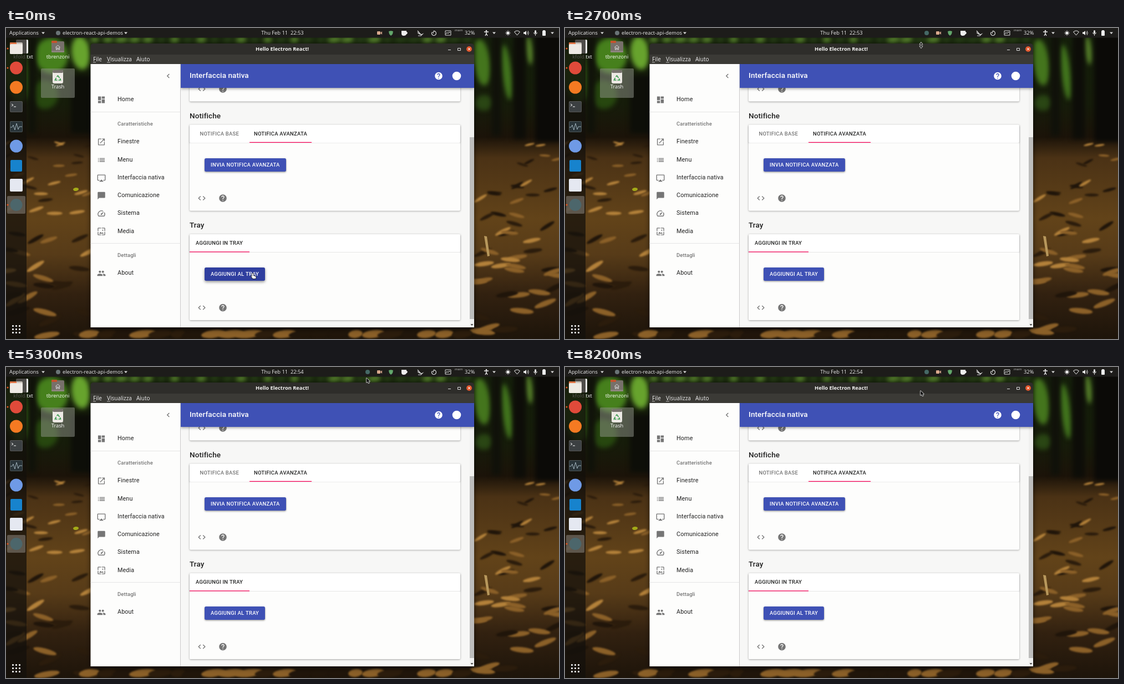
Write an HTML page with a canvas that moves like this. It is 997 px wide and 561 px high and loops after 8.3 s.

```html
<!DOCTYPE html>
<html lang="it">
<head>
<meta charset="utf-8">
<title>Hello Electron React!</title>
<style>
html, body { margin: 0; width: 100%; height: 100%; overflow: hidden; background: #1a1410; }
canvas { display: block; width: 100vw; height: 100vh; }
</style>
</head>
<body>
<canvas id="stage" width="997" height="561"></canvas>
<script>
const W = 997, H = 561, LOOP = 8300, STEP = 100;
const screen2d = document.getElementById('stage').getContext('2d');
const still = document.createElement('canvas');
still.width = W;
still.height = H;
let c = still.getContext('2d');

const UI = '"Open Sans", "Noto Sans", sans-serif';
const APP = 'Roboto, sans-serif';
const GREY = '#757575', INK = '#212121', BLUE = '#3f51b5', PINK = '#f50057', PAPER = '#fdfdfc';

const ICONS = {
  help: 'M12 2C6.48 2 2 6.48 2 12s4.48 10 10 10 10-4.48 10-10S17.52 2 12 2zm1 17h-2v-2h2v2zm2.07-7.75l-.9.92C13.45 12.9 13 13.5 13 15h-2v-.5c0-1.1.45-2.1 1.17-2.83l1.24-1.26c.37-.36.59-.86.59-1.41 0-1.1-.9-2-2-2s-2 .9-2 2H8c0-2.21 1.79-4 4-4s4 1.79 4 4c0 .88-.36 1.68-.93 2.25z',
  code: 'M9.4 16.6L4.8 12l4.6-4.6L8 6l-6 6 6 6 1.4-1.4zm5.2 0l4.6-4.6-4.6-4.6L16 6l6 6-6 6-1.4-1.4z',
  home: 'M3 13h8V3H3v10zm0 8h8v-6H3v6zm10 0h8V11h-8v10zm0-18v6h8V3h-8z',
  launch: 'M19 19H5V5h7V3H5c-1.11 0-2 .9-2 2v14c0 1.1.89 2 2 2h14c1.1 0 2-.9 2-2v-7h-2v7zM14 3v2h3.59l-9.83 9.83 1.41 1.41L19 6.41V10h2V3h-7z',
  list: 'M3 13h2v-2H3v2zm0 4h2v-2H3v2zm0-8h2V7H3v2zm4 4h14v-2H7v2zm0 4h14v-2H7v2zM7 7v2h14V7H7z',
  display: 'M6 22h12l-6-6zM21 3H3c-1.1 0-2 .9-2 2v12c0 1.1.9 2 2 2h4v-2H3V5h18v12h-4v2h4c1.1 0 2-.9 2-2V5c0-1.1-.9-2-2-2z',
  chat: 'M20 2H4c-1.1 0-2 .9-2 2v18l4-4h14c1.1 0 2-.9 2-2V4c0-1.1-.9-2-2-2z',
  speed: 'M20.38 8.57l-1.23 1.85a8 8 0 0 1-.22 7.58H5.07A8 8 0 0 1 15.58 6.85l1.85-1.23A10 10 0 0 0 3.35 19a2 2 0 0 0 1.72 1h13.85a2 2 0 0 0 1.74-1 10 10 0 0 0-.27-10.44zm-9.79 6.84a2 2 0 0 0 2.83 0l5.66-8.49-8.49 5.66a2 2 0 0 0 0 2.83z',
  media: 'M4 4h7V2H4c-1.1 0-2 .9-2 2v7h2V4zm6 9l-4 5h12l-3-4-2.03 2.71L10 13zm7-4.5c0-.83-.67-1.5-1.5-1.5S14 7.67 14 8.5s.67 1.5 1.5 1.5S17 9.33 17 8.5zM20 2h-7v2h7v7h2V4c0-1.1-.9-2-2-2zm0 18h-7v2h7c1.1 0 2-.9 2-2v-7h-2v7zM4 13H2v7c0 1.1.9 2 2 2h7v-2H4v-7z',
  people: 'M16 11c1.66 0 2.99-1.34 2.99-3S17.66 5 16 5c-1.66 0-3 1.34-3 3s1.34 3 3 3zm-8 0c1.66 0 2.99-1.34 2.99-3S9.66 5 8 5C6.34 5 5 6.34 5 8s1.34 3 3 3zm0 2c-2.33 0-7 1.17-7 3.5V19h14v-2.5c0-2.33-4.67-3.5-7-3.5zm8 0c-.29 0-.62.02-.97.05 1.16.84 1.97 1.97 1.97 3.45V19h6v-2.5c0-2.33-4.67-3.5-7-3.5z',
  back: 'M15.41 7.41L14 6l-6 6 6 6 1.41-1.41L10.83 12z'
};

function box(x, y, w, h, color, r = 0) {
  c.fillStyle = color;
  c.beginPath();
  c.roundRect(x, y, w, h, r);
  c.fill();
}

function disc(x, y, r, color) {
  c.fillStyle = color;
  c.beginPath();
  c.arc(x, y, r, 0, 7);
  c.fill();
}

function blob(x, y, rx, ry, color, turn = -0.12) {
  c.fillStyle = color;
  c.beginPath();
  c.ellipse(x, y, rx, ry, turn, 0, 7);
  c.fill();
}

function shape(d, x, y, fill, stroke, width = 1, scale = 1) {
  const path = new Path2D(d);
  c.save();
  c.translate(x, y);
  c.scale(scale, scale);
  c.lineWidth = width;
  if (stroke) { c.strokeStyle = stroke; c.stroke(path); }
  if (fill) { c.fillStyle = fill; c.fill(path); }
  c.restore();
}

function icon(name, x, y, color = GREY, size = 16.2) {
  shape(ICONS[name], x - size / 2, y - size / 2, color, null, 1, size / 24);
}

function text(s, x, y, font, color, align = 'left', spacing = 0) {
  c.font = font;
  c.fillStyle = color;
  c.textAlign = align;
  c.letterSpacing = spacing + 'px';
  c.fillText(s, x, y);
}

const ui = (s, x, y, color = '#eee', align, size = 9.3, weight = 400) =>
  text(s, x, y, `${weight} ${size}px ${UI}`, color, align);
const body = (s, x, y) => text(s, x, y, `10.8px ${APP}`, INK, 'left', 0.1);
const title = (s, x, y, color = INK) => text(s, x, y, `500 13.5px ${APP}`, color, 'left', 0.1);
const label = (s, x, y, color, spacing = 0.27) => text(s, x, y, `500 9.45px ${APP}`, color, 'left', spacing);

function shadowed(draw, alpha = 0.35, blur = 3, dy = 1) {
  c.save();
  c.shadowColor = `rgba(0,0,0,${alpha})`;
  c.shadowBlur = blur;
  c.shadowOffsetY = dy;
  draw();
  c.restore();
}

function seeded(seed) {
  return () => (seed = seed * 16807 % 2147483647) / 2147483647;
}

// Soft woodland: dark trunks, lit leaves, sunlit litter
function wallpaper() {
  const g = c.createLinearGradient(0, 17, 0, H);
  [[0, '#15200b'], [0.22, '#161c0a'], [0.33, '#1b1309'], [0.4, '#4b3215'],
   [0.6, '#624319'], [0.72, '#573b18'], [0.85, '#322110'], [1, '#1d140a']].forEach(s => g.addColorStop(...s));
  c.fillStyle = g;
  c.fillRect(0, 0, W, H);
  const rnd = seeded(11);
  c.save();
  c.filter = 'blur(4px)';
  for (let x = 160; x < 840; x += 24) {
    blob(x, 21, 8 + rnd() * 5, 6, rnd() < 0.5 ? '#55802c' : '#263c16');
  }
  [[82, 50, 30, 32, '#46801c'], [135, 45, 17, 30, '#67a32d'], [70, 120, 24, 26, '#27470f'],
   [20, 80, 24, 55, '#2c5212'], [858, 62, 15, 42, '#44751d'], [903, 80, 9, 50, '#41731d'],
   [943, 40, 7, 26, '#557e2a'], [862, 135, 16, 14, '#2a4614']
  ].forEach(p => blob(...p));
  box(40, 10, 14, 180, '#10120a');
  box(117, 85, 38, 105, '#0d0e08');
  box(876, 10, 16, 185, '#10110a');
  box(915, 10, 22, 190, '#0d0d08');
  box(954, 10, 50, 195, '#0b0a07');
  c.filter = 'blur(1.5px)';
  const tones = ['#20150a', '#2b1c0c', '#8b6028', '#b3813a'];
  for (let i = 0; i < 96; i++) {
    const x = i % 2 ? 844 + rnd() * 153 : rnd() * 155;
    const y = 205 + rnd() * 350;
    const near = (y - 180) / 370;
    const tone = tones[Math.floor(rnd() * (y > 440 ? 3 : 4))];
    blob(x, y, 8 + near * 15, 1.5 + near * 4, tone, (rnd() - 0.65) * 0.9);
  }
  for (let x = 150; x < 850; x += 32) {
    blob(x, 552, 12 + rnd() * 14, 7, tones[Math.floor(rnd() * 3)]);
  }
  c.restore();
  blob(126, 291, 5, 3, '#a3aa18');
  shape('M0 0L5 1L10 36L6 37Z', 862, 375, '#b8985c');
}

function desktop() {
  // file, home folder and trash
  box(18, 21, 22, 25, '#eee', 2);
  ui('kfold.txt', 31, 55, '#fff', 'center');
  box(82, 24, 23, 20, '#77706a', 2);
  box(82, 23, 10, 4, '#c5532d', 1);
  box(82, 41, 23, 3, '#8d857e', 1);
  shape('M-4 1L0-3L4 1M-3 0V5H-1V2H1V5H3V0', 93.5, 34, null, '#ddd');
  ui('tbrenzoni', 93.5, 55, '#fff', 'center');
  box(63, 73, 61, 53, 'rgba(145,150,140,.5)', 2);
  box(84, 76, 19, 24, '#ece9e4', 3);
  box(84, 76, 19, 5, '#77736d', 2);
  shape('M-2-3L0-5L3-1M4 0L5 3H1M-1 3H-5L-3-1', 93.5, 91, null, '#3a9a4e', 1.7);
  ui('Trash', 93.5, 109, '#fff', 'center');
}

function dock() {
  box(0, 17, 37, H - 17, 'rgba(18,16,12,.72)');
  box(2, 303, 33, 32, 'rgba(255,255,255,.25)', 2);
  for (const y of [37, 72, 319]) disc(3, y, 1.5, '#e95420');
  box(7, 26, 23, 21, '#c9c3bb', 2);
  box(7, 26, 12, 5, '#df7445', 1);
  box(7, 29, 23, 18, '#eeeae4', 2);
  disc(18.5, 72, 11.5, '#e04a3a');
  disc(18.5, 107, 11.5, '#f57a22');
  box(7, 132, 23, 20, '#565656', 2);
  box(8, 133, 21, 18, '#3c4042', 2);
  shape('M10 137L13 139L10 141M14 142H18', 0, 0, null, '#fff', 1);
  box(7, 168, 23, 20, '#4d5658', 2);
  box(8, 169, 21, 18, '#293439', 1);
  shape('M8 179H11L13 175L16 184L19 172L22 183L24 178H29', 0, 0, null, '#9caeb8', 1);
  disc(18.5, 213, 11.5, '#6f9ae6');
  box(8, 238, 21, 21, '#1783cd', 2);
  box(7, 272, 23, 23, '#e5e8f1', 2);
  disc(18.5, 319, 11, '#4c666b');
  for (let i = 0; i < 9; i++) box(11 + i % 3 * 6, 536 + Math.floor(i / 3) * 6, 3, 3, '#eee', 1);
}

const arrow = (x, y) => shape('M-3-1.5H3L0 2Z', x, y, '#ddd');

function topBar() {
  box(0, 0, W, 17.5, '#1d1c1a');
  ui('Applications', 6, 12);
  arrow(67, 9);
  disc(94, 9, 4, '#6a7476');
  ui('electron-react-api-demos', 102, 12);
  arrow(216, 9);
  box(669, 6, 6, 6, '#d9a98d', 1);
  shape('M675 9L678 6V12Z', 0, 0, '#d9a98d');
  shape('M-4-3L0-4L4-3L3 2L0 5L-3 2Z', 694, 9, '#63a76c');
  shape('M-5-4H4V2Q3 5-1 5Q-5 5-5 1ZM4-2Q7-2 5 2L4 2', 718, 9, '#eee');
  shape('M-4-4L2 3M-4-1Q0 4 5 2L2 5H-3', 746, 9, null, '#ddd', 1.2);
  shape('M-3-2A4 4 0 1 0 0-4V-2M0 0L-2-2', 771, 9.5, null, '#ddd', 1.2);
  shape('M-5-4H5V4H-5ZM-4 2L-2-1L0 1L2-2L4 0', 797, 9, null, '#ddd');
  ui('mem', 809, 6, '#bbb', 'left', 6);
  ui('32%', 827, 12);
  disc(866, 5, 1.3, '#eee');
  shape('M-4-2H4M0-2V1L-2 5M0 1L2 5', 866, 9, null, '#eee', 1.3);
  arrow(880, 9);
  disc(905, 9, 2.6, '#eee');
  shape('M0-5V5M-5 0H5M-3.5-3.5L3.5 3.5M3.5-3.5L-3.5 3.5', 905, 9, null, '#eee', 0.8);
  shape('M-5-2Q0-6 5-2L0 4Z', 921.5, 9, null, '#eee', 1);
  shape('M-4-1.5H-2L1-4V4L-2 1.5H-4Z', 937, 9, '#eee');
  shape('M3-2Q4 0 3 2M4-4Q7 0 4 4', 937, 9, null, '#ddd', 0.9);
  box(953, 4, 3, 6, '#eee', 1.5);
  shape('M-3 0Q-3 3 0 3Q3 3 3 0M0 3V6', 954.5, 8, null, '#eee', 0.9);
  box(967, 5, 6, 9, '#eee', 1);
  box(968, 4, 4, 2, '#eee');
  arrow(985, 9);
}

function tools(y) {
  icon('code', 353, y);
  icon('help', 391, y);
}

function card(top, tabs, bottom) {
  shadowed(() => box(331, top, 488, bottom - top, PAPER, 2));
  shadowed(() => box(331, top, 488, tabs - top, '#fff', 2), 0.25, 3);
  box(331, tabs, 488, bottom - tabs, PAPER, 2);
  box(331, tabs, 488, 0.6, '#ddd');
  tools(bottom - 22.5);
}

function button(s, x, y, w, color, lift = 0) {
  shadowed(() => box(x, y, w, 24, color, 2.7), 0.42, 3 + lift * 2, 1.2 + lift);
  label(s, x + 11, y + 15, '#fff');
}

function appWindow() {
  shadowed(() => box(152.5, 28, 691.5, 512, '#2e2d2a', [5, 5, 0, 0]), 0.6, 10, 3);
  ui('Hello Electron React!', 498, 41, '#f4f4f2', 'center', 9.3, 700);
  box(797, 39, 5, 1, '#ddd');
  shape('M814.5 36.5H819.5V40.5H814.5Z', 0, 0, null, '#ddd');
  disc(835, 38, 5, '#e2572c');
  shape('M-2-2L2 2M2-2L-2 2', 835, 38, null, '#fff', 1);
  box(152.5, 48, 691.5, 17, '#3b3a36');
  ui('File', 157, 60, '#eee', 'left', 10);
  ui('Visualizza', 182, 60, '#eee', 'left', 10);
  ui('Aiuto', 235, 60, '#eee', 'left', 10);
  box(157, 61.5, 5, 0.8, '#ddd');
  box(182, 61.5, 6, 0.8, '#ddd');

  box(315, 65, 529, 475, '#f7f7f6');
  box(836, 108, 8, 432, '#f0f0ef');
  box(836, 197, 8, 328, '#bdbdbc');
  shape('M-2.5-1H2.5L0 2Z', 840, 535, '#444');
  c.save();
  c.beginPath();
  c.rect(315, 108, 521, 432);
  c.clip();
  shadowed(() => box(331, 60, 488, 72.5, PAPER, 2));
  tools(110);
  title('Notifiche', 331, 163);
  card(174.5, 207, 329.5);
  label('NOTIFICA BASE', 349.5, 194, '#757575');
  label('NOTIFICA AVANZATA', 447, 194, INK);
  box(439, 205.7, 112, 1.4, PINK);
  button('INVIA NOTIFICA AVANZATA', 358, 235, 147, BLUE);
  title('Tray', 331, 360);
  card(372, 404.5, 527);
  label('AGGIUNGI IN TRAY', 342, 391, INK);
  box(331, 403.2, 108, 1.4, PINK);
  c.restore();

  shadowed(() => box(315, 65, 529, 43, BLUE), 0.4, 5, 1.5);
  title('Interfaccia nativa', 331, 90, '#fff');
  icon('help', 780, 86.5, '#fff');
  disc(812.5, 86.5, 7.8, '#fff');

  box(152.5, 65, 162, 475, PAPER);
  box(314, 65, 0.8, 475, '#d9d9d9');
  box(152.5, 151, 162, 0.8, '#dedede');
  box(152.5, 388, 162, 0.8, '#dedede');
  icon('back', 292.5, 86.5);
  label('Caratteristiche', 201, 176, GREY, 0.1);
  label('Dettagli', 201, 413, GREY, 0.1);
  [['home', 'Home', 129], ['launch', 'Finestre', 205], ['list', 'Menu', 237.5],
   ['display', 'Interfaccia nativa', 270], ['chat', 'Comunicazione', 302],
   ['speed', 'Sistema', 334], ['media', 'Media', 366.5], ['people', 'About', 442]
  ].forEach(([name, s, y]) => {
    icon(name, 172, y + 0.5);
    body(s, 201, Math.floor(y + 3.5));
  });
}

const clamp = v => Math.max(0, Math.min(1, v));
const PATH = [
  [0, 445, 443], [1900, 445, 443], [2600, 642, 31], [2800, 642, 31], [3050, 651, 10],
  [3500, 651, 10], [3800, 647, 32], [4200, 641, 75], [4700, 641, 75], [5300, 650, 20],
  [5500, 652, 10], [5850, 652, 10], [6350, 641, 75], [6800, 641, 75], [7200, 640, 48],
  [7900, 640, 48], [8150, 641, 43], [LOOP, 641, 43]
];

function pointerAt(t) {
  const i = PATH.findIndex((p, k) => k && t <= p[0]);
  const [t0, x0, y0] = PATH[i - 1], [t1, x1, y1] = PATH[i];
  const u = (t - t0) / (t1 - t0), e = u * u * (3 - 2 * u);
  return { x: x0 + (x1 - x0) * e, y: y0 + (y1 - y0) * e };
}

function trayMenu(alpha, checked, y) {
  c.save();
  c.globalAlpha = alpha;
  box(642, 16, 20, 1.6, '#e95420');
  shadowed(() => {
    box(581, 26, 142, 98, '#f7f7f6', 4);
    shape('M-7 7L0 0L7 7Z', 652, 19.5, '#f7f7f6');
  }, 0.5, 3);
  shape('M585 26H645L652 19.5L659 26H719Q723 26 723 30V120Q723 124 719 124H585Q581 124 581 120V30Q581 26 585 26Z', 0, 0, null, '#bbb', 0.7);
  ['Fantastico', 'Meraviglioso', 'Stupendo'].forEach((s, i) => {
    const top = 34.3 + i * 17.7;
    if (y >= top && y < top + 17.7) box(581.5, top, 141, 17.7, '#e5e5e4');
    ui(s, 595.5, top + 12.3, '#3b3b3b');
    if (i === checked) disc(590.5, top + 9, 1.4, '#3b3b3b');
  });
  box(629, 92.5, 44, 0.8, '#d0d0cf');
  ui('Esci', 595.5, 110.5, '#3b3b3b');
  c.restore();
}

function pointer({ x, y }, menuOpen) {
  c.lineJoin = 'round';
  if (x > 358 && x < 467 && y > 432 && y < 456) {
    shape('M-1 0Q0-1 1 0V4L5 5Q6 6 5 9H0L-3 5Q-2 4-1 5Z', x, y, '#fff', '#222', 1.6);
  } else if (!menuOpen && y > 26 && y < 34) {
    shape('M-2.5-1.5H2.5L0-5ZM-2.5 1.5H2.5L0 5Z', x, y, '#111', '#ddd', 1.6);
  } else {
    shape('M0 0V8L2 6.3L3.5 9.3L5 8.5L3.5 5.8H6Z', x, y, '#111', '#ddd', 1.5);
  }
}

function draw(t) {
  c = screen2d;
  c.drawImage(still, 0, 0);
  ui('Thu Feb 11  22:' + (t < 4700 ? '53' : '54'), 498.5, 12, '#eee', 'center');
  if (t >= 1000) disc(652, 9, 4, '#456966');
  const hover = clamp(1 - (t - 2000) / 250);
  const mix = (a, b) => Math.round(a + (b - a) * hover);
  button('AGGIUNGI AL TRAY', 358, 432, 109, `rgb(${mix(63, 48)},${mix(81, 63)},${mix(181, 159)})`, hover);
  const p = pointerAt(t);
  const fade = (from, to) => clamp((t - from) / 150) * clamp((to - t) / 150);
  const alpha = Math.max(fade(3200, 4850), fade(5600, 8100));
  if (alpha > 0) trayMenu(alpha, t < 4700 ? 1 : 2, p.y);
  pointer(p, alpha > 0);
}

wallpaper();
desktop();
dock();
appWindow();
topBar();

const start = performance.now();
function tick() {
  const t = (performance.now() - start) % LOOP;
  draw(Math.floor(t / STEP) * STEP);
  requestAnimationFrame(tick);
}
tick();
</script>
</body>
</html>
```
